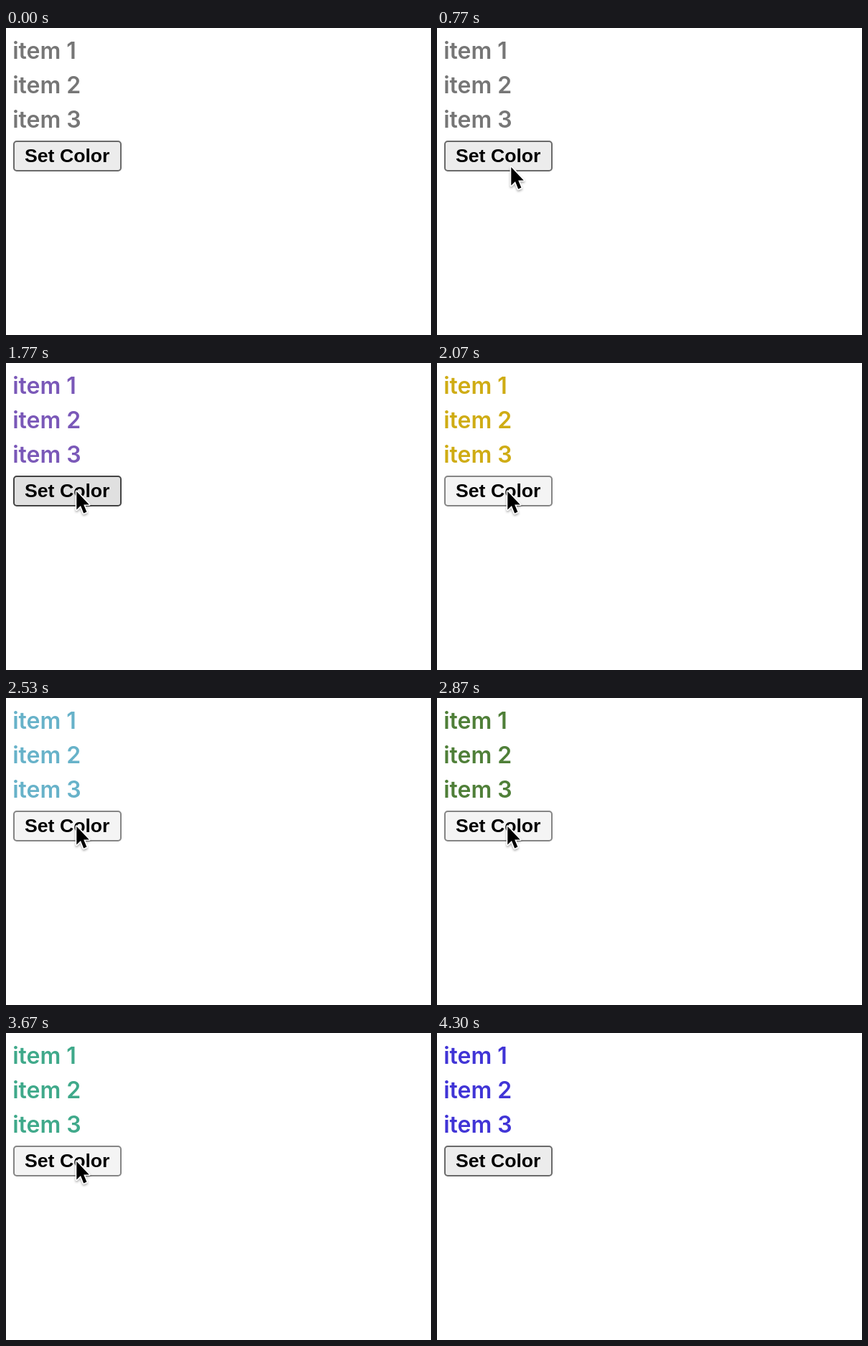
An HTML page for the animation above (5830 ms loop, 592x428 px).

```html
<!DOCTYPE html>
<html lang="en">
<head>
<meta charset="utf-8">
<title>Set Color</title>
<style>
  html, body { margin: 0; width: 100%; height: 100%; overflow: hidden; background: #fff; }
  svg { display: block; }
  #items { font: 600 32px Inter, "Open Sans", sans-serif; font-optical-sizing: none; }
  #label { font: 700 26.67px "Liberation Sans", Arial, sans-serif; }
  #cursor { filter: drop-shadow(0 2px 1.5px rgba(0, 0, 0, .3)); }
</style>
</head>
<body>
<svg width="592" height="428" viewBox="0 0 592 428">
  <g id="items">
    <text x="9.2" y="43">item 1</text>
    <text x="9.2" y="91">item 2</text>
    <text x="9.2" y="139">item 3</text>
  </g>
  <rect id="button" x="11" y="158" width="149" height="41" rx="4" stroke-width="2"/>
  <text id="label" x="26" y="187">Set Color</text>
  <path id="cursor" d="M1.3 2V27.5L7 22L11.2 32.4L15.4 30.6L11.2 20.4H18.8Z"
        fill="#000" stroke="#fff" stroke-width="3.4" stroke-linejoin="round" paint-order="stroke"/>
</svg>
<script>
const LOOP = 5830;
const [items, button, cursor] = ['items', 'button', 'cursor'].map(id => document.getElementById(id));

// Each click: press time, release time, colour picked on release
const clicks = [
  [1070, 1170, '#8fd1c6'],
  [1630, 1730, '#7a58b8'],
  [1840, 1940, '#cfac14'],
  [2050, 2150, '#5a9e4b'],
  [2270, 2380, '#67b2c9'],
  [2500, 2600, '#c96a9b'],
  [2690, 2800, '#4f7f38'],
  [2870, 2960, '#d98a4a'],
  [3060, 3160, '#b12f3b'],
  [3430, 3530, '#3fa98a'],
  [3640, 3740, '#a547c4'],
  [3850, 3950, '#4034d6']
];

const looks = {
  idle: ['#ececec', '#6a6a6a'],
  hover: ['#e0e0e0', '#434343'],
  press: ['#f4f4f4', '#858585']
};

const HOVER = 800, LEAVE = 4230;
const mix = (a, b, k) => a + (b - a) * k;
const easeOut = k => 1 - (1 - k) ** 2;

function glide(t, t0, t1, from, to) {
  const k = easeOut(Math.min(1, (t - t0) / (t1 - t0)));
  return from.map((v, i) => mix(v, to[i], k));
}

function cursorAt(t) {
  if (t < 200 || t >= 4300) return null;
  if (t < 800) return glide(t, 170, 770, [184, 428], [102, 192]);
  if (t < LEAVE) return glide(t, 770, 900, [102, 192], [97, 177]);
  return t < 4260 ? [215, 235] : [443, 365];
}

function draw(t) {
  let color = '#767676';
  let state = t >= HOVER && t < LEAVE ? 'hover' : 'idle';
  for (const [down, up, picked] of clicks) {
    if (t >= up) color = picked;
    else if (t >= down) state = 'press';
  }
  items.setAttribute('fill', color);

  const [fill, stroke] = looks[state];
  button.setAttribute('fill', fill);
  button.setAttribute('stroke', stroke);

  const p = cursorAt(t);
  cursor.style.display = p ? '' : 'none';
  if (p) cursor.setAttribute('transform', `translate(${p[0]} ${p[1]})`);
}

const start = performance.now();
function tick() {
  draw((performance.now() - start) % LOOP);
  requestAnimationFrame(tick);
}
draw(0);
requestAnimationFrame(tick);
</script>
</body>
</html>
```
